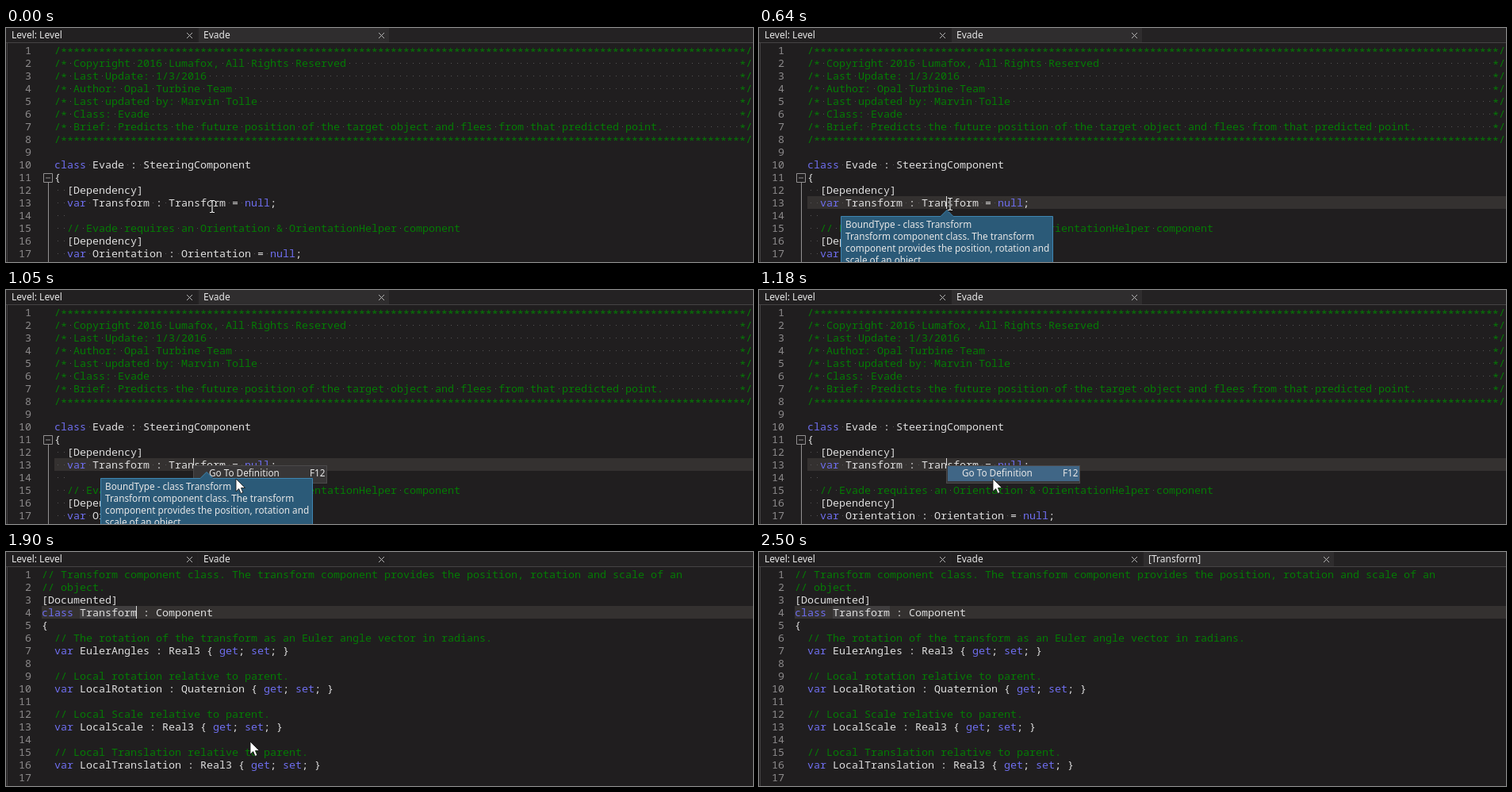
Recreate the animation shown at these times as an HTML page. Size 942 by 295 pixels, loop 3040 ms.

```html
<!DOCTYPE html>
<html lang="en">
<head>
<meta charset="utf-8">
<title>Go to definition</title>
<style>
html, body { margin: 0; width: 100%; height: 100%; overflow: hidden; background: #201e1f; }
svg { display: block; }
text { white-space: pre; font: 12px "Noto Sans", "Open Sans", sans-serif; fill: #e6e6e6; }
#tip text, #menu text { font-size: 11.75px; }
.code text { font: 13.3333px "Noto Sans Mono", "DejaVu Sans Mono", monospace; fill: #dedede; }
.code .comment { fill: #047c04; }
.code .key { fill: #6e6eee; }
.code .num { fill: #8c8a8b; text-anchor: end; }
.dot { fill: #555354; }
.cross { stroke: #b4b4b4; stroke-width: 1; }
.strip { fill: #242223; }
.tab { fill: #222021; }
.tab.on { fill: #2f2d2e; }
.row { fill: #343130; }
.caret { fill: #dcdcdc; }

.anim { animation: 3040ms step-end infinite; }
#evade, #evadeTab { animation-name: evade; }
#transform { animation-name: transform; }
#newTab { animation-name: newTab; }
#line13 { animation-name: line13; }
#caret1 { animation-name: caret1; }
#caret2 { animation-name: caret2; }
#tip { animation-name: tip; }
#menu { animation-name: menu; }
#hover { animation-name: hover; }
#ibeam { animation-name: ibeam; }
#arrow { animation-name: arrow; }

@keyframes evade { 0% { opacity: 1 } 62.5%, 100% { opacity: 0 } }
@keyframes transform { 0% { opacity: 0 } 62.5%, 100% { opacity: 1 } }
@keyframes newTab { 0% { opacity: 0 } 67.105%, 100% { opacity: 1 } }
@keyframes line13 { 0% { opacity: 0 } 18.421%, 100% { opacity: 1 } }
@keyframes caret1 { 0% { opacity: 0 } 18.421% { opacity: 1 } 43.75%, 100% { opacity: 0 } }
@keyframes caret2 { 0% { opacity: 1 } 82.237%, 100% { opacity: 0 } }
@keyframes tip {
  0% { opacity: 0; transform: translate(24px, 0) }
  2.961% { opacity: 1; transform: translate(24px, 0) }
  5.921% { opacity: 1; transform: translate(0, 0) }
  26.316% { opacity: 1; transform: translate(16px, 0) }
  35.855%, 100% { opacity: 0; transform: translate(16px, 0) }
}
@keyframes menu { 0% { opacity: 0 } 23.684% { opacity: 1 } 62.5%, 100% { opacity: 0 } }
@keyframes hover { 0% { opacity: 0 } 35.855%, 100% { opacity: 1 } }
@keyframes ibeam {
  0% { opacity: 1; transform: translate(260px, 225px) }
  2.961% { opacity: 1; transform: translate(257px, 224px) }
  5.921% { opacity: 1; transform: translate(239px, 221px) }
  18.421% { opacity: 1; transform: translate(240px, 222px) }
  21.053% { opacity: 1; transform: translate(241px, 222px) }
  23.684%, 100% { opacity: 0; transform: translate(241px, 222px) }
}
@keyframes arrow {
  0% { opacity: 0; transform: translate(238px, 222px) }
  23.684% { opacity: 1; transform: translate(238px, 222px) }
  26.316% { opacity: 1; transform: translate(252px, 227px) }
  28.947% { opacity: 1; transform: translate(268px, 232px) }
  31.579% { opacity: 1; transform: translate(281px, 236px) }
  34.539% { opacity: 1; transform: translate(290px, 238px) }
  35.855% { opacity: 1; transform: translate(293px, 238px) }
  38.816% { opacity: 1; transform: translate(295px, 238px) }
  43.75% { opacity: 1; transform: translate(298px, 238px) }
  46.053% { opacity: 1; transform: translate(302px, 239px) }
  48.684% { opacity: 1; transform: translate(306px, 239px) }
  51.316% { opacity: 1; transform: translate(308px, 239px) }
  67.105% { opacity: 1; transform: translate(311px, 246px) }
  69.737% { opacity: 1; transform: translate(314px, 253px) }
  72.368%, 100% { opacity: 0; transform: translate(314px, 253px) }
}
</style>
</head>
<body>
<svg width="942" height="295" viewBox="0 0 942 295">
  <rect width="942" height="295" fill="#201e1f"/>

  <rect class="strip" width="942" height="19"/>
  <rect class="tab" x="1" width="240" height="18"/>
  <rect class="tab" x="243" width="240" height="18"/>
  <rect id="evadeTab" class="tab on anim" x="243" width="240" height="18"/>
  <text x="7" y="13">Level: Level</text>
  <text x="249" y="13">Evade</text>
  <path class="cross" d="M228 6l7 7m0-7l-7 7M470 6l7 7m0-7l-7 7"/>
  <g id="newTab" class="anim">
    <rect class="tab on" x="485" width="240" height="18"/>
    <text x="491" y="13">[Transform]</text>
    <path class="cross" d="M712 6l7 7m0-7l-7 7"/>
  </g>
  <path d="M0 18.5H942M1.5 19V295" stroke="#454344" fill="none"/>

  <g id="numbers" class="code"></g>

  <g id="evade" class="anim">
    <rect id="line13" class="row anim" x="61" y="212" width="881" height="16"/>
    <path d="M47.5 183.5h11v11h-11zM50 189h6M53.5 195V295" fill="none" stroke="#929091"/>
    <g id="evadeCode" class="code"></g>
    <rect id="caret1" class="caret anim" x="236" y="212" width="1" height="16"/>
  </g>

  <g id="transform" class="anim">
    <rect class="row" x="45" y="68" width="897" height="16"/>
    <rect x="93" y="68" width="72" height="16" fill="#403e3f"/>
    <g id="transformCode" class="code"></g>
    <rect id="caret2" class="caret anim" x="164" y="68" width="1" height="16"/>
  </g>

  <g id="menu" class="anim">
    <rect x="236.5" y="221.5" width="168" height="22" fill="#383637" stroke="#4b494a"/>
    <rect id="hover" class="anim" x="238" y="222" width="166" height="19" fill="#406686"/>
    <text x="256" y="235">Go To Definition</text>
    <text x="383" y="235">F12</text>
  </g>

  <g id="tip" class="anim">
    <path d="M103.5 300V237.5H229L237 229.5L245 237.5H370.5V300Z" fill="#2b5a78" stroke="#3f86b2"/>
    <text x="109" y="252">BoundType - class Transform</text>
    <text x="109" y="267">Transform component class. The transform</text>
    <text x="109" y="282">component provides the position, rotation and</text>
    <text x="109" y="297">scale of an object.</text>
  </g>

  <g id="ibeam" class="anim" fill="none">
    <path d="M-3-7.5H-1L0-6.5L1-7.5H3M0-6.5V6.5M-3 7.5H-1L0 6.5L1 7.5H3" stroke="#111" stroke-width="2.6"/>
    <path d="M-3-7.5H-1L0-6.5L1-7.5H3M0-6.5V6.5M-3 7.5H-1L0 6.5L1 7.5H3" stroke="#f4f4f4" stroke-width="1.2"/>
  </g>
  <path id="arrow" class="anim" d="M0 0V16L3.7 12.6L6.2 18.4L8.8 17.3L6.4 11.5H11.5Z" fill="#fff" stroke="#111" stroke-width=".8"/>
</svg>

<script>
const CELL = 8, ROW = 16, TOP = 20;
const NS = "http://www.w3.org/2000/svg";
const KEYWORDS = /^(class|var|null|get|set)$/;

function add(parent, tag, attrs, content = "") {
  const el = document.createElementNS(NS, tag);
  for (const name in attrs) el.setAttribute(name, attrs[name]);
  el.textContent = content;
  parent.append(el);
}

function drawLine(parent, line, row, left, dots) {
  const y = TOP + row * ROW;
  const isComment = /^\s*\/[/*]/.test(line);
  for (const { 0: word, index } of line.matchAll(/\*+|\w+|[^\s\w*]+| /g)) {
    const x = left + index * CELL;
    if (word === " ") {
      if (dots) add(parent, "rect", { class: "dot", x: x + 4, y: y + 8, width: 1, height: 1 });
      continue;
    }
    const kind = isComment ? "comment" : KEYWORDS.test(word) ? "key" : "";
    // asterisks sit at mid-height
    add(parent, "text", { class: kind, x, y: y + (word[0] === "*" ? 15 : 13) }, word);
  }
}

function drawCode(id, lines, left, dots) {
  const parent = document.getElementById(id);
  lines.forEach((line, row) => drawLine(parent, line, row, left, dots));
}

const numbers = document.getElementById("numbers");
for (let n = 1; n <= 17; n++)
  add(numbers, "text", { class: "num", x: 32, y: TOP + n * ROW - 3 }, n);

const rule = "/" + "*".repeat(108) + "/";
const header = [
  "Copyright 2016 Lumafox, All Rights Reserved",
  "Last Update: 1/3/2016",
  "Author: Opal Turbine Team",
  "Last updated by: Marvin Tolle",
  "Class: Evade",
  "Brief: Predicts the future position of the target object and flees from that predicted point."
].map(s => ("/* " + s).padEnd(108) + "*/");

drawCode("evadeCode", [
  rule, ...header, rule,
  "",
  "class Evade : SteeringComponent",
  "{",
  "  [Dependency]",
  "  var Transform : Transform = null;",
  "  ",
  "  // Evade requires an Orientation & OrientationHelper component",
  "  [Dependency]",
  "  var Orientation : Orientation = null;"
], 61, true);

const property = (comment, name, type) =>
  ["  // " + comment, `  var ${name} : ${type} { get; set; }`, ""];

drawCode("transformCode", [
  "// Transform component class. The transform component provides the position, rotation and scale of an",
  "// object.",
  "[Documented]",
  "class Transform : Component",
  "{",
  ...property("The rotation of the transform as an Euler angle vector in radians.", "EulerAngles", "Real3"),
  ...property("Local rotation relative to parent.", "LocalRotation", "Quaternion"),
  ...property("Local Scale relative to parent.", "LocalScale", "Real3"),
  ...property("Local Translation relative to parent.", "LocalTranslation", "Real3")
], 45, false);
</script>
</body>
</html>
```
